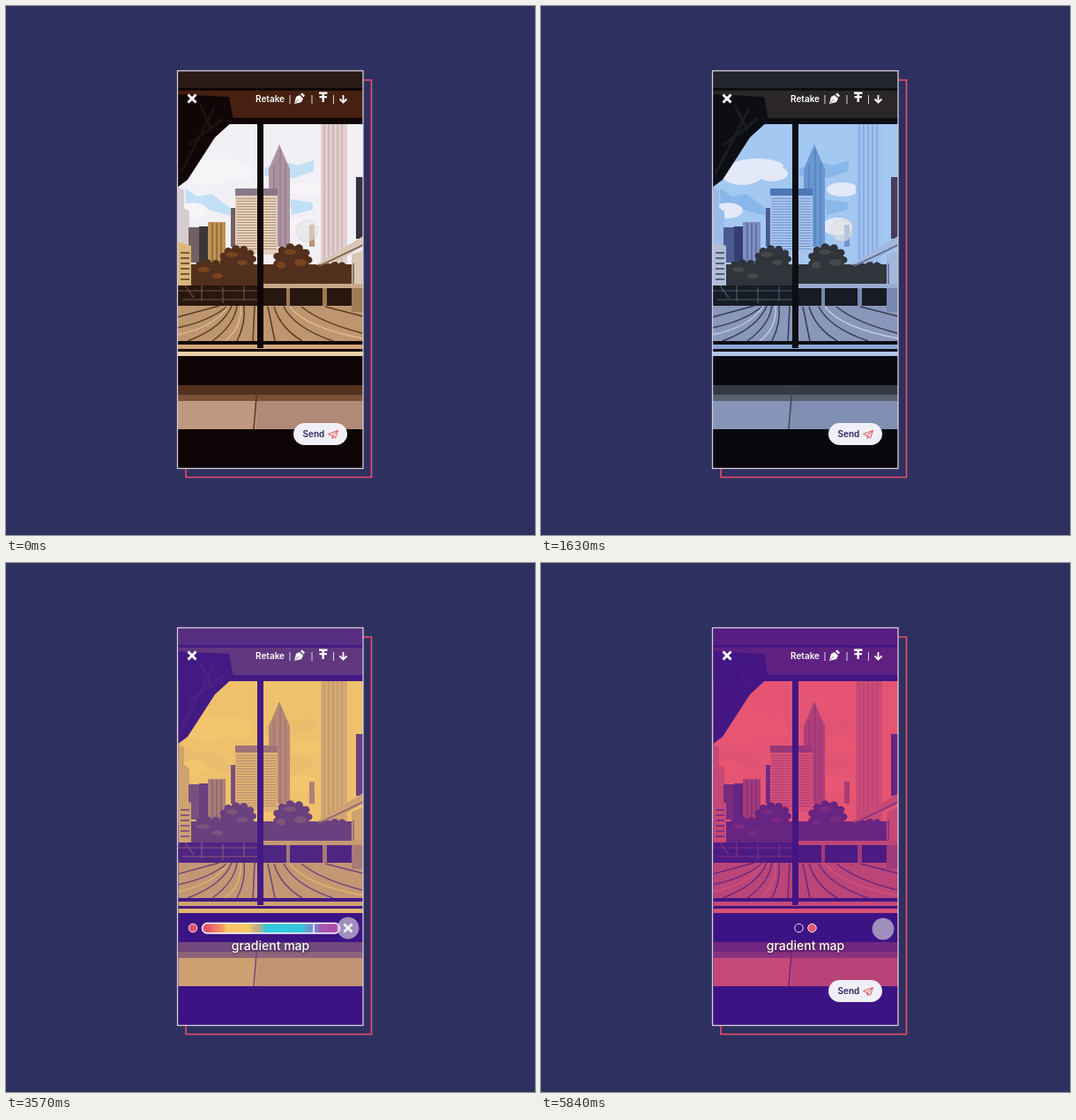
These frames come from a looping animation (600x600 px, 6450 ms). An HTML page:

```html
<!DOCTYPE html>
<html lang="en">
<head>
<meta charset="utf-8">
<title>Photo filters</title>
<style>
@property --dark { syntax: '<color>'; inherits: true; initial-value: #dc4865; }
@property --light { syntax: '<color>'; inherits: true; initial-value: #f8c663; }

html, body { margin: 0; width: 100%; height: 100%; overflow: hidden; background: #2e315f; }
svg { display: block; width: 100%; height: 100%; }
text { font-family: Inter, 'Open Sans', sans-serif; font-weight: 600; font-size: 10px; fill: #fff; }
.label { font-size: 14px; font-weight: 500; text-anchor: middle; filter: drop-shadow(0 1px 1.5px #0009); }
.icon { fill: none; stroke: #fff; stroke-width: 1.8; }
.cross { fill: none; stroke: #fff; stroke-width: 2.9; }
.dim { opacity: 0; }

#fall, #winter, #duo, .photo, .dim, .label, .editor, .idle, #handle, #touch {
  animation: 6450ms linear infinite both;
}
#fall { animation-name: fall-out; }
#fall .photo { animation-name: warm-up; }
#winter { animation-name: winter-move; }
#winter .photo { animation-name: cool-down; }
#winter .dim { animation-name: winter-dim; }
#duo { animation-name: duo-in, recolor; }
#duo .dim { animation-name: duo-dim; }
#fall .label { animation-name: fall-label; }
#winter .label { animation-name: winter-label; }
.editor { animation-name: editor; }
.idle { animation-name: idle; }
#handle { animation-name: handle; }
#touch { animation-name: touch; }

/* A page slides off to the right over one that follows at 30% of its speed. */
@keyframes fall-out {
  0%, 10.1% { transform: translateX(0); animation-timing-function: ease-in; }
  11.3%, 11.8% { transform: translateX(40px); animation-timing-function: ease-out; }
  20%, 100% { transform: translateX(212px); }
}
@keyframes winter-move {
  0%, 10.1% { transform: translateX(-63px); animation-timing-function: ease-in; }
  11.3%, 11.8% { transform: translateX(-50px); animation-timing-function: ease-out; }
  20%, 31% { transform: translateX(0); animation-timing-function: ease-in-out; }
  38%, 100% { transform: translateX(212px); }
}
@keyframes winter-dim {
  0%, 11.8% { opacity: .18; animation-timing-function: ease-out; }
  20%, 100% { opacity: 0; }
}
@keyframes duo-in {
  0%, 31% { transform: translateX(-63px); animation-timing-function: ease-in-out; }
  38%, 100% { transform: translateX(0); }
}
@keyframes duo-dim {
  0%, 31% { opacity: .18; animation-timing-function: ease-in-out; }
  38%, 100% { opacity: 0; }
}
/* The filters gain strength once their page is in view. */
@keyframes warm-up {
  0% { filter: sepia(0); }
  6%, 100% { filter: sepia(.2); }
}
@keyframes cool-down {
  0%, 12% { filter: saturate(.2); }
  22%, 100% { filter: saturate(1); }
}
@keyframes recolor {
  0%, 48.8% { --dark: #dc4865; --light: #f8c663; }
  54.3%, 71.3% { --dark: #3c1385; --light: #f3c56c; }
  79.7%, 100% { --dark: #3c1385; --light: #e85673; }
}
@keyframes fall-label { 0%, 1.6% { opacity: 0; } 4%, 100% { opacity: 1; } }
@keyframes winter-label { 0%, 26% { opacity: 0; } 28%, 100% { opacity: 1; } }
@keyframes editor {
  0%, 41.9%, 60.5%, 67.4%, 85.3%, 100% { opacity: 0; }
  45%, 57.4%, 70.5%, 82.2% { opacity: 1; }
}
@keyframes idle {
  0%, 41.9%, 60.5%, 67.4%, 85.3%, 100% { opacity: 1; }
  45%, 57.4%, 70.5%, 82.2% { opacity: 0; }
}
@keyframes handle {
  0%, 48.8% { transform: translateX(229px); }
  54.3%, 71.3% { transform: translateX(349px); }
  75.5% { transform: translateX(297px); }
  79.7%, 100% { transform: translateX(229px); }
}
@keyframes touch {
  0%, 38% { transform: translate(341.5px, 255px); animation-timing-function: ease-in-out; }
  41.1%, 44.2% { transform: translate(293px, 414px); }
  48.06% { transform: translate(381px, 414px); }
  50%, 58.1% { transform: translate(388px, 414px); animation-timing-function: ease-in-out; }
  65.1%, 68.2% { transform: translate(308px, 414px); }
  75.5% { transform: translate(381px, 430px); }
  79%, 100% { transform: translate(388px, 415px); }
}
</style>
</head>
<body>
<svg id="stage" viewBox="0 0 600 600">
  <defs>
    <clipPath id="screen"><path d="M194 73h211v452h-211z"/></clipPath>
    <clipPath id="sheet"><path d="M195.5 73h210v452h-210z"/></clipPath>
    <linearGradient id="ramp">
      <stop offset=".04" stop-color="#e5526c"/><stop offset=".09" stop-color="#ee7a62"/>
      <stop offset=".15" stop-color="#f19a62"/><stop offset=".18" stop-color="#fac768"/>
      <stop offset=".34" stop-color="#fac768"/><stop offset=".37" stop-color="#d3b67c"/>
      <stop offset=".43" stop-color="#a9b29a"/><stop offset=".46" stop-color="#33c8e0"/>
      <stop offset=".73" stop-color="#33c4e0"/><stop offset=".77" stop-color="#6c9bd4"/>
      <stop offset=".83" stop-color="#7d83cb"/><stop offset=".87" stop-color="#a653b2"/>
      <stop offset="1" stop-color="#ae4aa9"/>
    </linearGradient>
  </defs>
  <path d="M405 84h9.500v450.500H204v-10" fill="none" stroke="#ec4d68" stroke-width="1.6"/>
  <g id="pages" clip-path="url(#screen)"></g>
  <rect x="194.5" y="73.5" width="210.5" height="451" fill="none" stroke="#d8cbd8" stroke-width="1.3"/>
  <circle id="touch" r="12.3" fill="#e2e2e2" fill-opacity=".6" stroke="#aaa" stroke-opacity=".25"/>
</svg>
<script>
const box = (x, y, w, h) => `M${x} ${y}h${w}v${h}h${-w}z`;
const blob = (x, y, rx, ry) => `M${x - rx} ${y}a${rx} ${ry} 0 1 1 ${2 * rx} 0a${rx} ${ry} 0 1 1 ${-2 * rx} 0z`;

// A tree crown: a ring of leaf clumps around a full middle.
const tree = (x, y, rx, ry) => {
  let d = blob(x, y, rx * .8, ry * .8);
  for (let a = 0; a < 6.2; a += .57) {
    d += blob(x + rx * .75 * Math.cos(a), y + ry * .75 * Math.sin(a), 4.5, 4);
  }
  return d;
};

// Each part: warm colour, cold colour, lightness, path, then stroke width and dashes for lines.
const scene = [
  ['#0e0405', '#08080d', 0, box(194, 73, 211, 452)],
  ['#2b1b17', '#23252c', .15, box(194, 73, 211, 20)],
  ['#462011', '#2b2728', .2, box(194, 95, 211, 32)],
  // sky and clouds
  ['#f1f0f5', '#a3c8f1', .98, box(194, 134, 211, 160)],
  ['#c1e0f6', '#8ab7ea', .95, 'M293 185l18-10 20 6 18-6v12l-22 8-34-2zM322 219l26 4v8l-24 6zM203 207l14 9 16-3 26 20v6l-30-8-25 2z'],
  ['#f6f4f7', '#e3e9f8', 1, blob(245, 182, 30, 9) + blob(228, 190, 24, 13) + blob(262, 190, 18, 9) + blob(342, 208, 18, 8) + blob(336, 250, 17, 10) + blob(212, 232, 17, 9)],
  // skyline
  ['#d5ccd0', '#9abbe6', .8, 'M194 205l8 4v20l6 4v40h-14z'],
  ['#726063', '#4c5990', .34, box(255, 229, 6, 44) + box(207, 251, 12, 40)],
  ['#3c3537', '#343e72', .25, box(219, 250, 10, 42)],
  ['#c09252', '#7e90c4', .6, box(229, 245, 20, 47)],
  ['#6b5036', '#465387', .35, 'M234 246v44M239 246v44M244 246v44', 1],
  ['#ab93a0', '#6a97d0', .66, 'M298 185l12-28 12 28v88h-24z'],
  ['#87747f', '#4b7ab8', .48, 'M311 162v110M317 178v94M304 180v92', 1],
  ['#e4cfb8', '#a6c2ea', .88, box(260, 207, 48, 75)],
  ['#b39680', '#7799d0', .7, 'M284 218v60', 45, '1 2'],
  ['#89778a', '#4e77b8', .54, box(260, 207, 48, 8)],
  ['#e2d0d0', '#a2c2ef', .84, box(357, 134, 30, 160)],
  ['#c3a9ae', '#769fd8', .7, [361, 366, 371, 376, 381].map(x => `M${x} 134v158`).join(''), 1.2],
  ['#bc956d', '#7194cf', .62, box(344, 248, 6, 25)],
  ['#36303e', '#473c5b', .25, box(397, 194, 8, 70)],
  ['#dab67b', '#b1bed9', .8, 'M194 267l16 5v48h-16z'],
  ['#785734', '#52607f', .4, 'M203 279v34', 10, '2 4'],
  // trees
  ['#53301d', '#30343b', .25, tree(263, 287, 22, 16) + tree(231, 301, 23, 13) + tree(325, 288, 24, 20) + tree(375, 302, 20, 11) + box(210, 293, 182, 25)],
  ['#79451f', '#48484b', .36, blob(256, 282, 7, 3) + blob(268, 291, 6, 3) + blob(224, 299, 7, 3) + blob(240, 306, 6, 3) + blob(322, 279, 7, 3) + blob(334, 291, 7, 4) + blob(312, 294, 5, 4)],
  // overpass, bridge and rails
  ['#d8c7b5', '#a3b6db', .8, 'M351 294l54-33v12l-31 17zM392 282l13-5v70h-13z'],
  ['#765e4c', '#576a91', .45, 'M355 295l50-24M394 292v52', 1.5],
  ['#bd966f', '#8997bb', .74, box(194, 338, 211, 44)],
  ['#28170f', '#171b23', .1, box(194, 317, 211, 23)],
  ['#74543c', '#4f5b77', .4, 'M194 323h95M200 333h85M203 317l10 14M222 317v18M246 319v18M270 318v16', 1.2],
  ['#c7a888', '#98abd0', .75, box(290, 315, 115, 5)],
  ['#a07b56', '#7688ae', .58, box(318, 320, 4, 20) + box(359, 320, 5, 20) + box(392, 320, 13, 27)],
  ['#5b3b26', '#353c50', .28, 'M194 353l48-13M194 365q36-7 58-25M206 380q40-15 50-40M234 380q25-18 28-40M262 380q10-20 8-40M280 380l2-40M297 341l8 39M304 341q7 24 32 39M315 341q12 24 56 39M335 341q22 18 69 30M362 341l43 11', 1.5],
  ['#e0ba8c', '#c0cbe5', .9, 'M194 373q44-9 58-33M322 341q18 24 83 36M248 380q20-15 18-40', 1.4],
  // window frame and sill
  ['#100607', '#0d0e14', .04, 'M194 93h211v3H194zM194 127h211v7H194zM194 100l59 3 5 27-21 19-31 48-12 9z' + box(285, 132, 7, 263)],
  ['#1e1110', '#1a1c23', .08, 'M198 190l38-74M207 158l39-30M220 112l14 30', 3],
  ['#100607', '#0d0e14', .04, box(194, 380, 211, 18)],
  ['#d1a577', '#8ba6d4', .8, box(194, 384, 211, 5)],
  ['#ead0a7', '#b1c4e8', .92, box(194, 392, 211, 5)],
  ['#100607', '#0d0e14', .04, box(285, 380, 7, 8)],
  ['#54301f', '#363b43', .3, box(194, 430, 211, 18)],
  ['#7b5138', '#59616f', .45, box(194, 441, 211, 8)],
  ['#bf997f', '#8795b8', .8, box(194, 448, 211, 32)],
  ['#b08a76', '#7f8eb2', .72, box(284, 448, 121, 32)],
  ['#573624', '#3d4453', .3, 'M285 430l-4 50', 1.5],
];

const looks = {
  duo: p => `color-mix(in srgb, var(--light) ${Math.round(p[2] * 100)}%, var(--dark))`,
  winter: p => p[1],
  fall: p => p[0],
};

const photo = look => scene.map(p => {
  const [, , , d, width, dash = 'none'] = p;
  const paint = width
    ? `fill:none;stroke:${look(p)};stroke-width:${width};stroke-dasharray:${dash}`
    : `fill:${look(p)}`;
  return `<path d="${d}" style="${paint}"/>`;
}).join('');

const cross = (x, y) => `<path class="cross" d="M${x - 4.5} ${y - 4.5}l9 9m0-9l-9 9"/>`;

const toolbar = cross(211, 105) + `
  <text x="283" y="109">Retake</text>
  <path d="M322 101v10M347 101v10M371.5 101v10" stroke="#fff" stroke-opacity=".8"/>
  <path d="M327 111l2-8 4-2 4 4-2 4zM334 100l2-1.5 3 3-1.5 2z" fill="#fff"/>
  <path d="M328 110l4-4" stroke="#555" stroke-width=".8"/>
  <path d="M355 97.5h9.5v2.5h-9.5zM358.5 100h2.5v2h-2.5zM355.5 102h8.5v2.2h-8.5zM358.5 104h2.5v5h-2.5z" fill="#fff"/>
  <path class="icon" d="M382.5 101v8.5m-4-4l4 4 4-4"/>`;

const send = `
  <rect x="326" y="473" width="61" height="25" rx="12.5" fill="#f1eff7"/>
  <text x="336.5" y="489.3" style="fill:#2b2860">Send</text>
  <path d="M365.5 485.5l11-4-3 8.5-3.5-2.5zM376.5 481.5l-6.5 6v3l2-1.800" fill="none" stroke="#e45252" stroke-linejoin="round"/>`;

const label = name => `<text class="label" x="300" y="438.500">${name}</text>`;

const editor = `
  <g class="idle" stroke="#e8dff0">
    <circle cx="292.5" cy="414" r="4.8" style="fill:var(--dark)"/>
    <circle cx="307.5" cy="414" r="4.8" style="fill:var(--light)"/>
  </g>
  <g class="editor">
    <circle cx="212" cy="414" r="4.8" fill="#e8545f" stroke="#e8dff0"/>
    <rect x="222.5" y="408.5" width="156" height="11.5" rx="5.75" fill="url(#ramp)" stroke="#fff" stroke-width="1.5"/>
    <path id="handle" d="M0 409v10.5" stroke="#fff" stroke-width="1.5"/>
    ${cross(388, 414)}
  </g>`;

const page = (id, extra) => `
  <g id="${id}">
    <g clip-path="url(#sheet)"><g class="photo">${photo(looks[id])}</g></g>
    ${toolbar}${extra}
    <path class="dim" d="${box(194, 73, 211, 452)}"/>
  </g>`;

document.getElementById('pages').innerHTML =
  page('duo', label('gradient map') + editor + `<g class="idle">${send}</g>`) +
  page('winter', label('winter') + send) +
  page('fall', label('fall') + send);
</script>
</body>
</html>
```
